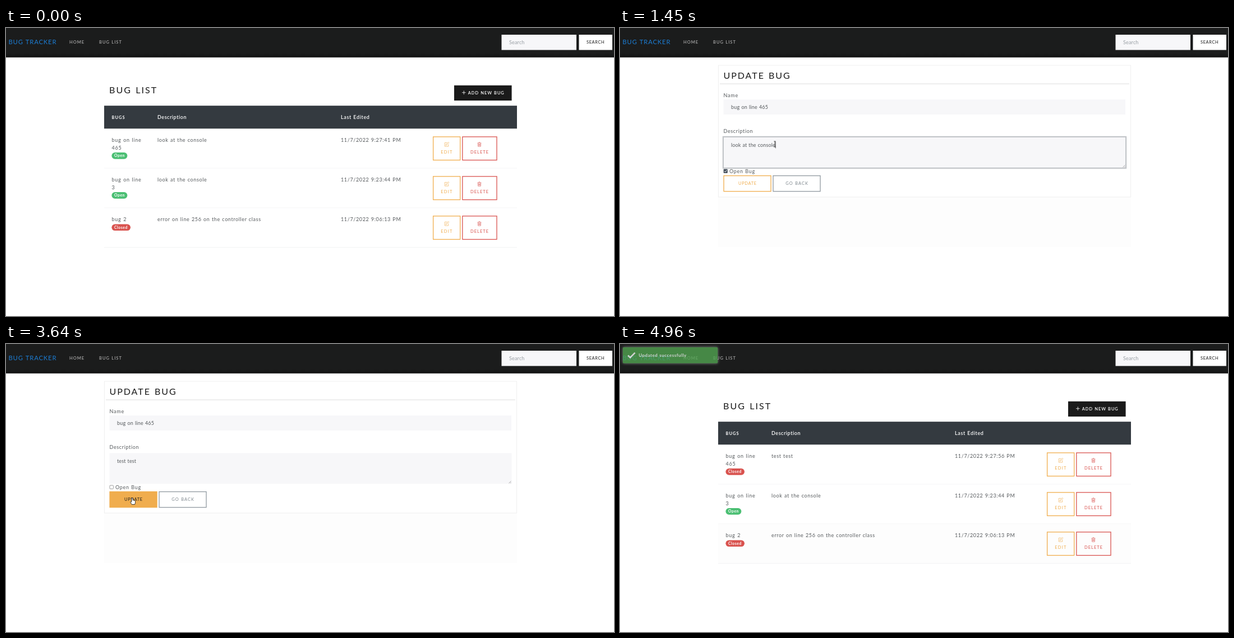
An HTML page for the animation above (5.29 s loop, 1084 by 516 pixels).

```html
<!DOCTYPE html>
<html lang="en">
<head>
<meta charset="utf-8">
<title>Bug list</title>
<style>
  html, body { margin: 0; width: 100%; height: 100%; overflow: hidden; background: #fff; }
  svg { display: block; width: 100%; height: 100%; font-family: Lato, "Open Sans", sans-serif; }
  text { word-spacing: .065em; white-space: pre; }
  .toast { filter: drop-shadow(0 0 2.5px #999); }
</style>
</head>
<body>
<svg id="stage" viewBox="0 0 1084 516"></svg>
<script>
const LOOP = 5290, STEPS = 80;
const INK = '#1a1a1a', BODY = '#55595c', ORANGE = '#f0ad4e', RED = '#d9534f', GREEN = '#4bbf73';
const stage = document.getElementById('stage');

// Cursor path: step, x, y
const PATH = [
  [6, 1012, 469], [8, 940, 400], [10, 870, 300], [12, 795, 226], [14, 782, 218], [15, 667, 216.5],
  [17, 450, 212], [21, 282, 207], [22, 276, 208], [23, 150, 195], [24, 14, 167], [25, 20.5, 173.5],
  [41, 20.5, 173.5], [47, 191.5, 250], [50, 191, 252], [55, 225, 276], [61, 225, 276],
  [65, 273, 244], [67, 320, 262], [74, 991, 511]
];
const KEYS = [32, 33, 35, 36, 37, 39, 40, 42, 43];
const TYPED = 'test test';

const clamp = v => Math.max(0, Math.min(1, v));

function cursorAt(k) {
  if (k < 6 || k > 74) return null;
  const i = Math.max(1, PATH.findIndex(p => p[0] >= k));
  const [a, b] = [PATH[i - 1], PATH[i]];
  const u = (k - a[0]) / (b[0] - a[0]);
  return { x: a[1] + (b[1] - a[1]) * u, y: a[2] + (b[2] - a[2]) * u };
}

const rect = (x, y, w, h, fill, more = '') =>
  `<rect x="${x}" y="${y}" width="${w}" height="${h}" fill="${fill}" ${more}/>`;

const line = (d, color, w = 1, more = '') =>
  `<path d="${d}" fill="none" stroke="${color}" stroke-width="${w}" ${more}/>`;

const text = (x, y, s, { size = 9.03, fill = BODY, gap = .62, weight = 400, more = '' } = {}) =>
  `<text x="${x}" y="${y}" font-size="${size}" fill="${fill}" letter-spacing="${gap}" font-weight="${weight}" ${more}>${s}</text>`;

const caps = (x, y, s, fill, weight = 400, gap = 1) => text(x, y, s, { size: 7.5, fill, weight, gap });

const outline = (x, y, w, h, color, fill = 'none') =>
  rect(x + .65, y + .65, w - 1.3, h - 1.3, fill, `stroke="${color}" stroke-width="1.3"`);

function navbar() {
  return rect(0, 0, 1084, 52.7, 'url(#bar)')
    + text(4.5, 29.2, 'BUG TRACKER', { size: 11.3, fill: '#1c7dd4', gap: .8 })
    + caps(113, 28.3, 'HOME', '#a9a9a9', 600)
    + caps(166, 28.3, 'BUG LIST', '#a9a9a9', 600)
    + rect(883.5, 12, 133.5, 27.4, '#f7f7f9')
    + text(897, 28.6, 'Search', { fill: '#999fa5', gap: .17 })
    + rect(1021.5, 12, 59.5, 27.4, '#fff')
    + caps(1035, 28.2, 'SEARCH', INK, 400, .57);
}

const pencil = (x, y, c) =>
  line(`M${x + .8} ${y - 3}H${x - 3.2}V${y + 3.6}H${x + 3.2}V${y}M${x - 1.4} ${y + 1.6}l.5-1.7 4-4 1.2 1.2-4 4z`, c, .65);

const trash = (x, y, c) =>
  line(`M${x - 3.3} ${y - 2.5}H${x + 3.3}M${x - 1} ${y - 2.8}v-.8h2v.8M${x - 2.6} ${y - 2.4}l.3 6.2h4.6l.3-6.2M${x - 1} ${y - 1}v3.5M${x} ${y - 1}v3.5M${x + 1} ${y - 1}v3.5`, c, .65);

function badge(y, open) {
  return rect(188.4, y, open ? 28 : 33.6, 11.6, open ? GREEN : RED, 'rx="5.8"')
    + text(193, y + 8.2, open ? 'Open' : 'Closed', { size: 6.8, fill: '#fff', gap: .55, weight: 700 });
}

function row(i, [name, desc, date, open], bg, lit) {
  const y = 180.5 + i * 71, c = lit ? INK : ORANGE;
  return rect(175, y, 736, 70.5, bg)
    + line(`M175 ${y + 70.7}H911`, '#eeeff0', .8)
    + name.map((s, n) => text(188.5, y + 23.6 + n * 13.55, s, { gap: .75 })).join('')
    + badge(y + 29 + 13.55 * (name.length - 1), open)
    + text(270, y + 23.6, desc) + text(597, y + 23.6, date)
    + outline(761, y + 13.8, 49.4, 43, ORANGE, lit ? ORANGE : 'none')
    + pencil(785.5, y + 28, c) + caps(775.2, y + 44.5, 'EDIT', c, 400, 1.25)
    + outline(813.2, y + 13.8, 62.5, 43, RED)
    + trash(844, y + 28, RED) + caps(828, y + 44.5, 'DELETE', RED, 400, 1);
}

function listPage(k, cur) {
  const done = k >= 59;
  const rows = [
    [['bug on line', '465'], done ? TYPED : 'look at the console', `11/7/2022 9:27:${done ? 56 : 41} PM`, !done],
    [['bug on line', '3'], 'look at the console', '11/7/2022 9:23:44 PM', true],
    [['bug 2'], 'error on line 256 on the controller class', '11/7/2022 9:06:13 PM', false]
  ];
  const live = cur && (k < 58 || k > 62) && cur.x > 175 && cur.x < 911;
  const hot = live ? Math.floor((cur.y - 180.5) / 71) : -1;
  const shade = i => i === hot ? '#eaeaea'
    : i === 2 && k > 8 || i === 1 && k > 10 && k < 72 ? '#fdfdfd' : '#fff';
  return text(184, 117.2, 'BUG LIST', { size: 16, fill: INK, gap: 2.07 })
    + rect(799, 102.8, 102.6, 27.2, INK)
    + line('M813 115.7h6.6M816.3 112.4v6.6', '#fff', .8)
    + caps(823.8, 118.5, 'ADD NEW BUG', '#fff', 600, .9)
    + rect(175, 139.2, 736, 41.3, '#343a40')
    + caps(188.5, 163, 'BUGS', '#fff', 700, 1.05)
    + text(270, 162.6, 'Description', { fill: '#fff', gap: .53, weight: 600 })
    + text(597, 162.6, 'Last Edited', { fill: '#fff', weight: 600 })
    + rows.map((r, i) => row(i, r, shade(i), i === 0 && k >= 12 && k < 17)).join('');
}

function formPage(k) {
  const focus = k >= 22 && k < 50, picked = k >= 23 && k < 32;
  const value = k < 32 ? 'look at the console' : TYPED.slice(0, KEYS.filter(s => s <= k).length);
  const hot = k >= 54;
  return rect(175, 303, 736, 89, '#fdfdfd')
    + rect(175.4, 66.9, 735, 236, '#fff', 'stroke="#ececec" stroke-width=".8"')
    + text(184.5, 90.7, 'UPDATE BUG', { size: 16, fill: INK, gap: 1.95 })
    + line('M178 100H908', '#dcdcdc')
    + text(184.5, 124, 'Name', { gap: .8 })
    + rect(184.5, 128, 716.5, 27, '#f7f7f9')
    + text(198, 144.6, 'bug on line 465', { gap: .19 })
    + text(184.5, 187.6, 'Description')
    + rect(184.5, 195.5, 717, 55, '#f7f7f9')
    + (focus ? rect(183.9, 194.9, 718.2, 56.2, 'none', 'stroke="#c2c5c9" stroke-width="2.2"') : '')
    + line('M896.5 249.5l4-4M899 249.5l1.5-1.5', '#777', .6)
    + (picked ? rect(198, 203, 77, 12.5, '#2f7de0') : '')
    + text(198, 212.6, value, { gap: .12, fill: picked ? '#fff' : BODY, more: 'id="value"' })
    + (focus && !picked ? '<rect id="caret" y="203.5" width=".7" height="12" fill="#222"/>' : '')
    + (k < 50
      ? rect(184.6, 252.8, 7.2, 7.2, '#46505c', 'rx="1"') + line('M186 256.4l1.6 1.7 2.9-3.6', '#fff', 1)
      : rect(185, 253.2, 6.4, 6.4, '#fff', 'rx="1" stroke="#767676" stroke-width=".7"'))
    + text(195, 260, 'Open Bug', { gap: .7 })
    + outline(184.4, 264, 85.3, 29.3, ORANGE, hot ? ORANGE : 'none')
    + caps(211, 281.2, 'UPDATE', hot ? INK : ORANGE, 400, .65)
    + outline(272.4, 264, 85.3, 29.3, '#919aa1')
    + caps(295.3, 281.2, 'GO BACK', '#7d868d');
}

function toast(k) {
  const a = .8 * clamp((k - 60.5) / 4.5);
  if (k < 61) return '';
  return `<g class="toast" opacity="${a}">${rect(5, 5.8, 169.2, 28.8, '#51a351', 'rx="1.7"')}`
    + line('M14.3 20.3l3.8 4 8.6-8.6', '#fff', 2.6)
    + text(33.2, 23, 'Updated successfully', { size: 8, fill: '#fff', gap: .5, weight: 700 }) + '</g>';
}

function pointer(k, cur, form) {
  if (!cur) return '';
  const { x, y } = cur;
  const inArea = form && x > 184 && x < 902 && y > 195 && y < 249;
  const hand = k >= 12 && k < 15 || k >= 54 && k < 63;
  let shape;
  if (inArea && k < 24) {
    shape = line('M-1.6-5H1.6M0-5V5M-1.6 5H1.6', '#222', .8);
  } else if (hand) {
    shape = '<path d="M-1.2 6V.6Q0-1 1.2.6V4Q2.2 3.2 3 4.3 4 3.7 4.5 4.7 5.6 4.4 5.6 5.7V8.2L4.6 11.5H-.6L-3.4 7.4Q-3.2 5.8-1.2 7.2Z" fill="#fff" stroke="#111" stroke-width=".8"/>';
  } else {
    shape = '<path d="M0 0V8.6L2 6.8 3.4 10 4.9 9.3 3.5 6.3H6.1Z" fill="#000" stroke="#fff" stroke-width=".6" paint-order="stroke"/>';
  }
  const fade = k >= 32 && k < 42 ? .65 : 1;
  return `<g transform="translate(${x} ${y})" opacity="${fade}">${shape}</g>`;
}

const DEFS = '<defs><linearGradient id="bar" x2="0" y2="1"><stop offset=".86" stop-color="#1b1c1c"/><stop offset="1" stop-color="#111"/></linearGradient></defs>';

function draw(k) {
  const cur = cursorAt(k), form = k >= 17 && k < 59;
  stage.innerHTML = DEFS + navbar() + (form ? formPage(k) : listPage(k, cur)) + toast(k) + pointer(k, cur, form);
  const caret = document.getElementById('caret');
  if (caret) caret.setAttribute('x', 198 + document.getElementById('value').getComputedTextLength());
}

let shown = -1;
function tick() {
  const t = performance.now() % LOOP;
  const k = Math.floor(t * STEPS / LOOP + .15) % STEPS;
  if (k !== shown) draw(shown = k);
  requestAnimationFrame(tick);
}
tick();
</script>
</body>
</html>
```
